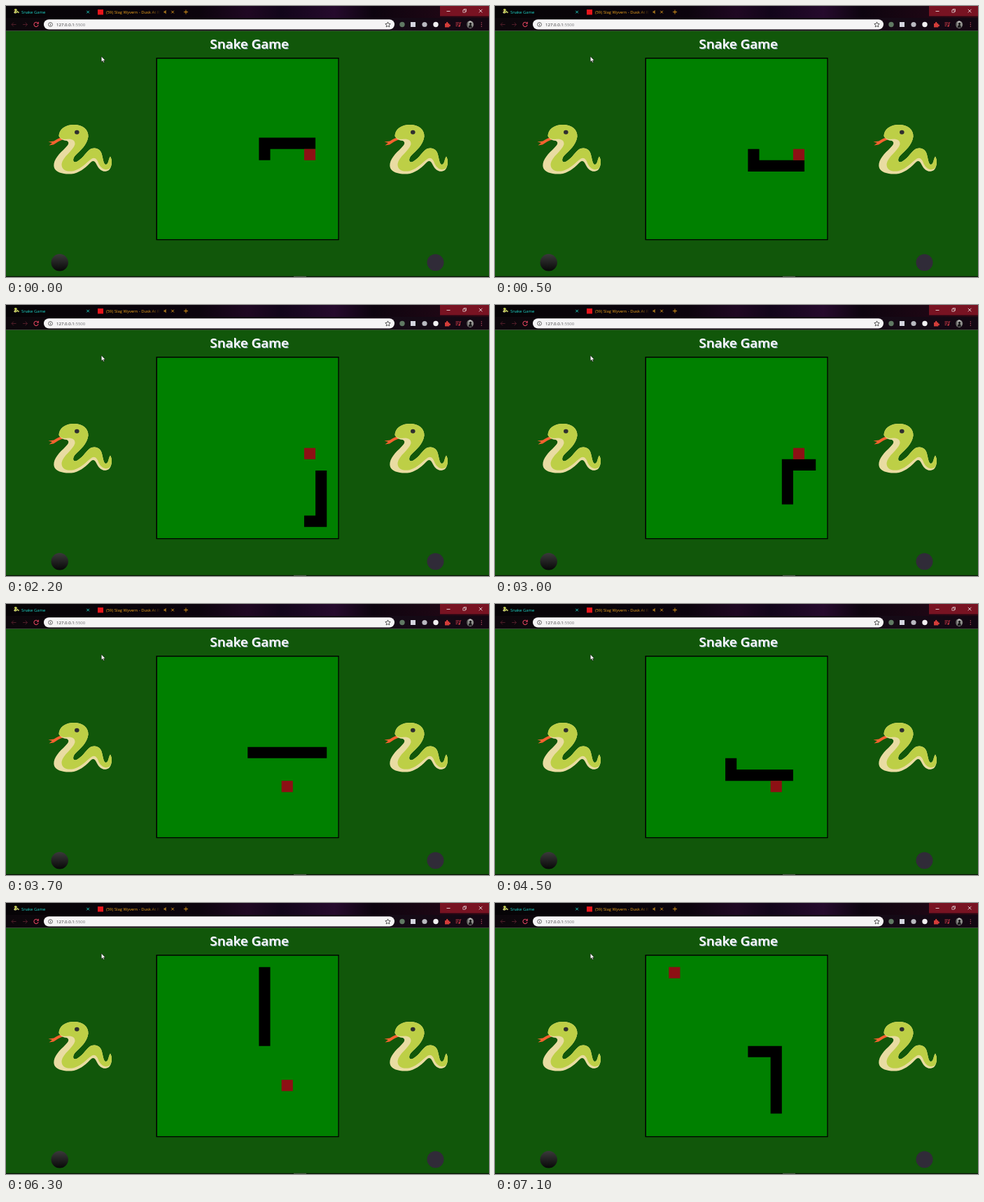
An HTML page for the animation above (7200 ms loop, 690 by 388 pixels).

```html
<!DOCTYPE html>
<html lang="en">
<head>
<meta charset="utf-8">
<title>Snake Game</title>
<style>
  html, body { margin: 0; width: 100%; height: 100%; overflow: hidden; background: #11570a; }
  svg { display: block; width: 690px; height: 388px; }
  text { font-family: "Open Sans", "Noto Sans", sans-serif; }
  .tab { font-size: 5.9px; }
  .line { fill: none; stroke-width: .9; }
</style>
</head>
<body>
<svg viewBox="0 0 690 388">
  <defs>
    <linearGradient id="strip">
      <stop offset="0" stop-color="#060406"/>
      <stop offset=".4" stop-color="#0c040d"/>
      <stop offset=".5" stop-color="#200823"/>
      <stop offset=".57" stop-color="#12051a"/>
      <stop offset=".68" stop-color="#260a2d"/>
      <stop offset=".76" stop-color="#0d040f"/>
      <stop offset=".9" stop-color="#1e0714"/>
      <stop offset="1" stop-color="#2a0812"/>
    </linearGradient>
    <linearGradient id="bar">
      <stop offset="0" stop-color="#0c070b"/>
      <stop offset=".8" stop-color="#150a16"/>
      <stop offset="1" stop-color="#130712"/>
    </linearGradient>
    <linearGradient id="fade" gradientUnits="userSpaceOnUse" x1="205" x2="221">
      <stop offset="0" stop-color="#f2a51c"/>
      <stop offset="1" stop-color="#f2a51c" stop-opacity="0"/>
    </linearGradient>
    <linearGradient id="photo">
      <stop offset="0" stop-color="#303030"/>
      <stop offset=".5" stop-color="#d4d4d0"/>
      <stop offset="1" stop-color="#6a6a68"/>
    </linearGradient>
    <linearGradient id="disc" x2="0" y2="1">
      <stop offset="0" stop-color="#3a3a3a"/>
      <stop offset="1" stop-color="#080808"/>
    </linearGradient>
    <g id="serpent">
      <path d="M80 188.5C74 189 71 192 68 193.5L60.500 194.500L66 196L61.500 199.500L68 198.500C73 195 76 193 81 191.500Z" fill="#f4622f"/>
      <path d="M75.500 186C76 176 85 170 97 170C110 170 118 177 117.500 187C116 199 106 207 99 214C94 220 96 225 101 223C109 219 113 211 119 206C126 201 134 204 136.500 211C139 219 139 227 143 227C147 226 146 219 149 215.500C152 220 152 230 147 235C141 239 134 236 130.500 229C128 224 126 220 122 223C115 230 108 237 97 240C85 242 72 239 69 232C66 224 73 214 82 206C88 200 92 196 87 193C82 193 77 190 75.500 186Z" fill="#e9dca2"/>
      <path d="M75.500 186C76 176 85 170 97 170C110 170 118 177 117.500 187C116 199 106 207 99 214C94 220 96 225 101 223C109 219 113 211 119 206C126 201 134 204 136.500 211C139 219 139 227 143 227C147 226 146 219 149 215.500C152 220 152 229 147.500 233C142 236 136 233 132.500 226C130 219 127 216 122 219C115 224 108 233 97 236C87 238 79 235 79.500 226C81 216 96 207 98.500 198C99 192 94 190 88 190.500C82 191.500 77 190 75.500 186Z" fill="#bdcf46"/>
      <ellipse cx="101.300" cy="180.700" rx="3.300" ry="3" fill="#2f2f2f"/>
    </g>
  </defs>

  <rect width="690" height="388" fill="#11570a"/>
  <rect y="386.800" width="690" height="1.200" fill="#091407"/>
  <rect x="411" y="386.800" width="18" height="1.200" fill="#4a5547"/>

  <!-- browser window -->
  <rect width="690" height="18" fill="url(#strip)"/>
  <rect y="17" width="690" height="18.500" fill="url(#bar)"/>
  <rect y="35" width="690" height="1" fill="#3b4638"/>
  <rect x="620" width="70" height="14.500" fill="#781322"/>
  <g class="line" stroke="#e9dde0">
    <path d="M629.500 7.500h5M675.800 4.800l4.600 4.600m0-4.600l-4.600 4.600"/>
    <path d="M652.800 5.800h3.400v3.400h-3.400zM654 5.800v-1.300h3.500v3.500h-1.300" stroke-width=".7"/>
  </g>

  <use href="#serpent" transform="translate(5.300 -10.700) scale(.088)"/>
  <text class="tab" x="22" y="11" fill="#1fd8cb">Snake Game</text>
  <path class="line" d="M115.300 6.800l3.600 3.600m0-3.600l-3.600 3.600" stroke="#1fd8cb"/>
  <rect x="131" y="5" width="8" height="7.500" fill="#e8151b"/>
  <text class="tab" x="143" y="11" fill="url(#fade)">(59) Slag Wyvern - Dusk At R</text>
  <path d="M225.500 7.500h1.300l1.900-1.700v5.600l-1.900-1.700h-1.300z" fill="#a5741d"/>
  <path class="line" d="M236.300 6.800l3.600 3.600m0-3.600l-3.600 3.600M257 5.600v6m-3-3h6" stroke="#e69c1c"/>

  <g class="line">
    <path d="M14.500 26.500H8m2.800-2.800L8 26.500l2.800 2.800M24 26.500h6.500m-2.800-2.800l2.800 2.800l-2.800 2.800" stroke="#57202c"/>
    <path d="M45.700 24.500a3.200 3.200 0 1 0 .5 2.700M46.300 22.800v2.400h-2.400" stroke="#d8425c" stroke-width="1.100"/>
  </g>
  <rect x="54" y="19.200" width="501" height="14.400" rx="7.200" fill="#f5f4f5"/>
  <circle class="line" cx="63.500" cy="26.500" r="2.900" stroke="#555" stroke-width=".7"/>
  <path class="line" d="M63.500 26v2.200M63.500 24.600v.7" stroke="#555" stroke-width=".7"/>
  <text x="72" y="28.800" font-size="6.100" fill="#29292b">127.0.0.1<tspan fill="#77777a">:5500</tspan></text>
  <path class="line" d="M545.500 22.900l1.100 2.400 2.600.3-1.900 1.800.5 2.600-2.300-1.300-2.300 1.300.5-2.600-1.900-1.800 2.600-.3z" stroke="#444" stroke-width=".8"/>
  <circle cx="566" cy="26.500" r="3.700" fill="#607963"/>
  <rect x="578" y="23" width="7" height="7" fill="#d4d4de"/>
  <circle cx="598" cy="26.500" r="3.600" fill="#b9b9c0"/>
  <circle cx="614" cy="26.500" r="3.700" fill="#f2f0f2"/>
  <path d="M627 25h2a1.400 1.400 0 1 1 2.400 0h1.800v1.700a1.300 1.300 0 1 1 0 2.400v1.400h-6.200z" fill="#d33d39"/>
  <path class="line" d="M642.500 24h5m-5 2.200h4m-4 2.200h2.500M648.500 28.300v-4.400h1.800" stroke="#d33d4a"/>
  <circle cx="647.500" cy="28.600" r="1.200" fill="#d33d4a"/>
  <circle cx="663" cy="26.500" r="5.200" fill="url(#photo)"/>
  <path d="M660.800 31.200c0-3 .6-4 1.800-4.300a1.700 1.700 0 1 1 1.800 0c1 .5 1.500 2 1.300 4.100z" fill="#1d1d1d"/>
  <path d="M679.300 23.800v.1m0 2.600v.1m0 2.600v.1" stroke="#c65266" stroke-width="1.300" stroke-linecap="round"/>

  <!-- page -->
  <g font-size="18.800" font-weight="600" text-anchor="middle">
    <text x="348.700" y="62.300" fill="#8fa6b4">Snake Game</text>
    <text x="347.600" y="61.200" fill="#fff">Snake Game</text>
  </g>
  <use href="#serpent"/>
  <use href="#serpent" x="480"/>
  <circle cx="76.700" cy="367.300" r="12.200" fill="url(#disc)"/>
  <circle cx="613.500" cy="367.300" r="12" fill="#302b38"/>

  <rect x="214.500" y="74" width="261.200" height="261.200" fill="#000"/>
  <rect x="216" y="75.500" width="258.400" height="258.400" fill="#008000"/>
  <g transform="translate(216 75.500) scale(16.150)">
    <polyline id="snake" fill="none" stroke="#000" stroke-linecap="square" stroke-linejoin="miter"/>
    <rect id="food" width="1" height="1" fill="#8d1014"/>
  </g>

  <path d="M136.200 72v8l1.800-1.600 1.200 2.700 1.400-.6-1.200-2.600h2.500z" fill="#fff" stroke="#111" stroke-width=".6"/>
</svg>
<script>
const STEP = 100, STEPS = 72, LEAD = 5;
const DIRS = { L: [-1, 0], R: [1, 0], U: [0, -1], D: [0, 1] };
const ROUTE = "L4 D2 R4 D1 L2 U3 R3 D7 L2 U5 R2 U1 L7 D2 R5 U9 L3 D7 R2 D5";

// Each meal lasts until the step on which the head reaches it.
const MEALS = [
  { until: 32, length: 6, at: [13, 8] },
  { until: 69, length: 7, at: [11, 11] },
  { until: STEPS, length: 8, at: [2, 1] },
];

const trail = [[13, 7]];
for (const [dir, ...count] of ROUTE.split(" ")) {
  const [dx, dy] = DIRS[dir];
  for (let n = +count.join(""); n > 0; n--) {
    const [x, y] = trail[trail.length - 1];
    trail.push([x + dx, y + dy]);
  }
}

const snake = document.getElementById("snake");
const food = document.getElementById("food");
const start = performance.now();
let shown = -1;

function draw(step) {
  const meal = MEALS.find(m => step <= m.until);
  const end = step + LEAD + 1;
  const body = trail.slice(end - meal.length, end);
  snake.setAttribute("points", body.map(([x, y]) => `${x + .5},${y + .5}`).join(" "));
  food.setAttribute("x", meal.at[0]);
  food.setAttribute("y", meal.at[1]);
}

function tick() {
  const step = Math.floor((performance.now() - start) / STEP) % STEPS;
  if (step !== shown) draw(shown = step);
  requestAnimationFrame(tick);
}
tick();
</script>
</body>
</html>
```
